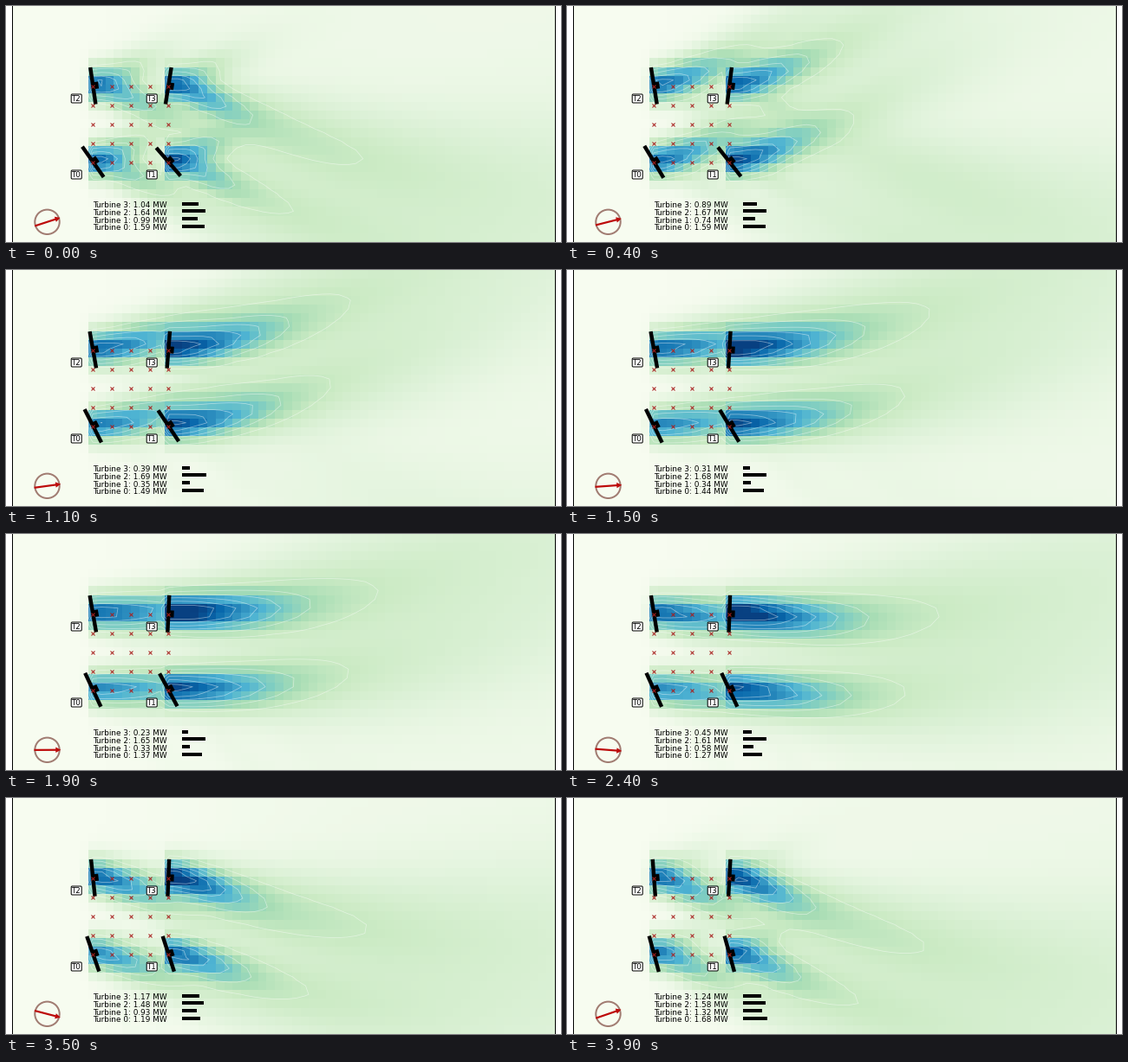
A matplotlib script that plays this animation: 640x273 px, repeating every 4 s.

```python
import numpy as np
import matplotlib.pyplot as plt
from matplotlib.animation import FuncAnimation
from matplotlib.patches import Circle, FancyBboxPatch, Polygon

W, H, DPI = 640, 273, 100
FRAMES, STEP_MS = 40, 100
PX = 72 / DPI  # points per pixel

HUBS = [(100, 180), (187, 180), (100, 92), (187, 92)]
# Yaw of each turbine in degrees, a polynomial over the loop (-1 to 1)
YAW = [(-7, 0, -3, 25), (0, 0, -12.7, 28), (0, -3.6, -2, 9.8), (0, -3.5, 3, -2.5)]
# Wake depth of each turbine: value after the wind jump, later change
DEPTH = [(0.92, -0.22), (1.0, -0.2), (0.78, 0.05), (0.7, 0.28)]
# Key points of the power read-out in MW
KEYS = [0, 4, 11, 19, 24, 30, 39]
POWER = [
    (1.59, 1.59, 1.49, 1.37, 1.27, 1.22, 1.68),
    (0.99, 0.74, 0.35, 0.33, 0.58, 0.91, 1.32),
    (1.64, 1.67, 1.69, 1.65, 1.61, 1.52, 1.58),
    (1.04, 0.89, 0.39, 0.23, 0.45, 0.95, 1.24),
]

COLS, ROWS = 64, 27
LEFT, RIGHT, TOP, BOTTOM = 7.3, 633.3, -0.3, 272.8
FLOW = 45  # pixels the wind carries a wake per frame
dx, dy = (RIGHT - LEFT) / COLS, (BOTTOM - TOP) / ROWS
X, Y = np.meshgrid(LEFT + dx * (np.arange(COLS) + 0.5),
                   TOP + dy * (np.arange(ROWS) + 0.5))
LEVELS = np.arange(0.26, 0.95, 0.13)


def sigmoid(x):
    return 1 / (1 + np.exp(-np.clip(x, -50, 50)))


def age(i):
    """Frames since the wind last jumped back."""
    return (i + 1) % FRAMES


def wind(phase):
    return 19 - 0.935 * phase


def yaw(n, i):
    return np.polyval(YAW[n], (i - 19.5) / 19.5)


def alignment(n, i):
    return np.cos(np.radians(yaw(n, i) - wind(age(i)))) ** 1.88


def power(n, i):
    ratio = [p / alignment(n, k) for p, k in zip(POWER[n], KEYS)]
    return np.interp(i, KEYS, ratio) * alignment(n, i)


def plume(n, phase):
    """Wake whose far parts still follow the wind they were shed in."""
    x0, y0 = HUBS[n]
    s = X - x0
    d = np.maximum(s, 0)
    shed = np.maximum(phase - d / FLOW, 0)
    slope = 0.03 - np.tan(np.radians(1.4 * wind(shed)))
    off = Y - (y0 - 1.5 + slope * d * d / (d + 25))

    p = phase / FRAMES
    first, change = DEPTH[n]
    depth = first + change * (1 - np.exp(-5 * p))
    reach = 68 + 55 * max(np.sin(np.pi * p), 0) ** 1.5
    core = 0.7 * np.exp(-(d / reach) ** 2 - 0.5 * (off / (13 + 0.03 * d)) ** 2)
    tail = 0.36 * np.exp(-d / 350 - 0.5 * (off / (15 + 0.11 * d)) ** 2)
    return depth * sigmoid((s + 5) / 1.6) * (core + tail)


def field(i):
    a = age(i)
    total = np.zeros_like(X)
    for n, (x0, _) in enumerate(HUBS):
        # the fresh wake pushes the one from before the jump downstream
        fresh = sigmoid((FLOW * a - 25 - (X - x0)) / (30 + 6 * a))
        total += fresh * plume(n, a) ** 2
        total += (1 - fresh) * plume(n, a + FRAMES) ** 2
    haze = 0.045 * sigmoid((X - 260) / 60)
    return np.clip(np.sqrt(total) + haze, 0, 1)


fig = plt.figure(figsize=(W / DPI, H / DPI), dpi=DPI, facecolor="white")
ax = fig.add_axes([0, 0, 1, 1])
image = ax.imshow(field(0), cmap="GnBu", vmin=0, vmax=1, aspect="auto",
                  interpolation="nearest", extent=[LEFT, RIGHT, BOTTOM, TOP])
ax.set_xlim(0, W)
ax.set_ylim(H, 0)
ax.axis("off")


def line(width, color="black", **kw):
    return ax.plot([], [], color=color, lw=width * PX, **kw)[0]


def text(x, y, size, label="", **kw):
    return ax.text(x, y, label, fontsize=size * PX, family="DejaVu Sans",
                   va="baseline", zorder=8, **kw)


for x in (7, 633):
    ax.plot([x, x], [-5, H + 5], color="black", lw=PX, zorder=3)

gx, gy = np.meshgrid(np.linspace(100.3, 187.3, 5), np.linspace(92.5, 180.5, 5))
ax.plot(gx.ravel(), gy.ravel(), "x", color="#a8201f", ms=4 * PX,
        mew=1.0 * PX, zorder=6)

blades = [line(4.4, solid_capstyle="butt", zorder=5) for _ in HUBS]
nacelles = [line(8, solid_capstyle="butt", zorder=5) for _ in HUBS]
bars = [line(4, solid_capstyle="projecting", zorder=5) for _ in HUBS]
labels = [text(100.4, 259.3 - 8.7 * n, 8.85) for n in range(4)]

for n, (hx, hy) in enumerate(HUBS):
    cx, cy = hx - 18.8, hy + 15
    ax.add_patch(FancyBboxPatch((cx - 4.8, cy - 3.8), 9.6, 7.6,
                                boxstyle="round,pad=1.2", fc="white",
                                ec="black", lw=PX, zorder=7))
    text(cx, cy + 3.2, 8.7, f"T{n}", ha="center")

HUB = np.array([47.5, 249.8])
RED = "#bd0a0a"
ax.add_patch(Circle(HUB, 14.2, fill=False, ec="#a17c72", lw=2 * PX, zorder=5))
shaft = line(2.2, RED, solid_capstyle="butt", zorder=6)
head = ax.add_patch(Polygon(np.zeros((3, 2)), fc=RED, ec="none", zorder=6))
contours = []


def set_line(artist, a, b):
    artist.set_data([a[0], b[0]], [a[1], b[1]])


def axes_of(angle):
    """Unit vectors along and across a direction, with y pointing down."""
    c, s = np.cos(np.radians(angle)), np.sin(np.radians(angle))
    return np.array([c, -s]), np.array([s, c])


def draw(i):
    v = field(i)
    image.set_data(v)
    while contours:
        contours.pop().remove()
    contours.append(ax.contour(X, Y, v, levels=LEVELS, colors="white",
                               linewidths=0.8 * PX, alpha=0.45, zorder=2))

    for n, hub in enumerate(HUBS):
        along, across = axes_of(yaw(n, i))
        p = np.array(hub) + 0.3
        set_line(blades[n], p - 21.5 * across, p + 21.5 * across)
        set_line(nacelles[n], p, p + 6.3 * along)
        mw = power(n, i)
        y = 254.6 - 8.6 * n
        set_line(bars[n], (205, y), (205 + 14 * mw, y))
        labels[n].set_text(f"Turbine {n}: {mw:.2f} MW")

    along, across = axes_of(wind(age(i)))
    tip = HUB + 15.8 * along
    neck = tip - 6 * along
    set_line(shaft, HUB - 15 * along, neck + along)
    head.set_xy([tip, neck + 3.2 * across, neck - 3.2 * across])


anim = FuncAnimation(fig, draw, frames=FRAMES, init_func=lambda: draw(0),
                     interval=STEP_MS, repeat=True, repeat_delay=0, blit=False)
plt.show()
```
